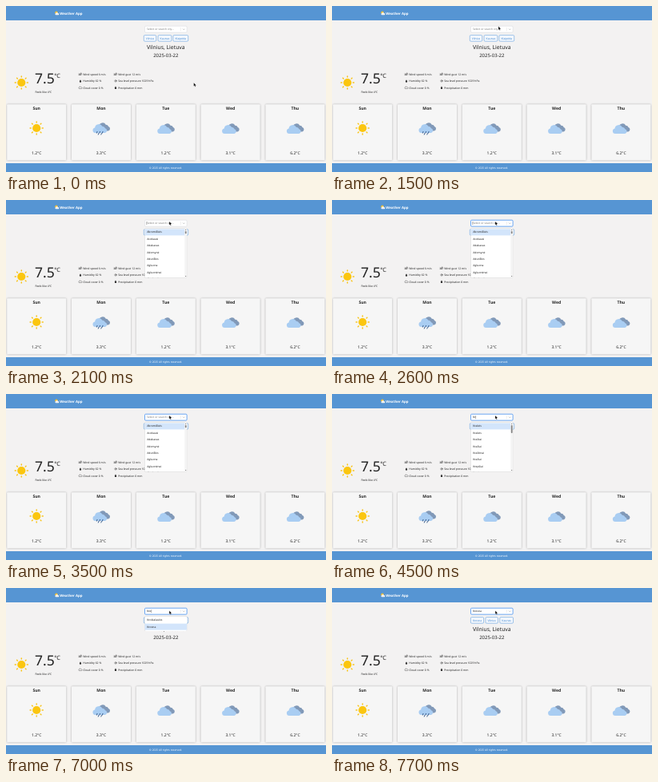
Write an HTML page that moves like this. It is 400 px wide and 208 px high and loops after 8 s.

```html
<!DOCTYPE html>
<html lang="lt">
<head>
<meta charset="utf-8">
<title>Weather App</title>
<style>
  html, body { margin: 0; width: 100%; height: 100%; overflow: hidden; background: #f3f2f2; }
  svg { display: block; width: 400px; height: 208px; }
  text { font-family: "Noto Sans", "Open Sans", sans-serif; fill: #222; text-rendering: geometricPrecision; }
  .bar { fill: #5695d3; }
  .light { fill: #fff; }
  .bold { font-weight: 700; }
  .hint { fill: #808080; }
  .chip { fill: #f4f8fd; stroke: #4a90d9; stroke-width: .5; }
  .chip-label { fill: #3f86d2; }
  .card { fill: #f6f6f6; filter: drop-shadow(0 .8px 1px rgba(0, 0, 0, .3)); }
  .menu { fill: #fff; filter: drop-shadow(0 .6px .7px rgba(0, 0, 0, .3)); }
  .pick { fill: #d3e5fb; }
  .line { fill: none; stroke: #333; stroke-width: .45; stroke-linecap: round; }
</style>
</head>
<body>
<svg id="stage" viewBox="0 0 400 208">
  <defs>
    <g id="sun">
      <path id="rays" stroke="#f8c51d" stroke-width="1.5" stroke-linecap="round"/>
      <circle r="5.1" fill="#fbc60f"/>
    </g>
    <path id="puff" d="M-6 5.2a3.4 3.4 0 0 1-.5-6.7A5 5 0 0 1 2.8-3.2 3.7 3.7 0 0 1 6.4-.6a3 3 0 0 1-.2 5.8Z"/>
    <g id="clouds">
      <use href="#puff" transform="translate(3.2 -1.4) scale(.92)" fill="#8199b8"/>
      <use href="#puff" transform="translate(-1.4 .9)" fill="#a9cdf2"/>
    </g>
    <g id="rain">
      <use href="#clouds" y="-1"/>
      <path d="M-5 3.4l-.6 1.8M-1.5 3.4l-.6 1.8M2 3.4l-.6 1.8M-3.2 5.6l-.5 1.5M.4 5.6l-.5 1.5" stroke="#3d5f8d" stroke-width="1" stroke-linecap="round"/>
    </g>
    <path id="wind" class="line" d="M-2-.5H.8a.6.6 0 1 0-.6-.6M-1.6.3H1.8M-2 1H.6"/>
    <path id="drop" d="M0-1.7C.5-.8 1.2-.1 1.2.6a1.2 1.2 0 0 1-2.4 0C-1.2-.1-.5-.8 0-1.7Z" fill="#333"/>
    <use id="cover" href="#puff" transform="scale(.24)" fill="none" stroke="#333" stroke-width="1.7"/>
    <g id="gauge" class="line"><circle r="1.2"/><path d="M0 0l.6-.6"/></g>
    <clipPath id="list"><rect x="173.5" y="35.4" width="52.6" height="62.2" rx="1.2"/></clipPath>
  </defs>
</svg>
<script>
const LOOP = 8000;
const stage = document.getElementById('stage');
const timed = [];

document.getElementById('rays').setAttribute('d', Array.from({ length: 8 }, (_, i) => {
  const a = i * Math.PI / 4, at = r => `${r * Math.cos(a)} ${r * Math.sin(a)}`;
  return `M${at(7)}L${at(8.1)}`;
}).join(''));

function add(tag, attrs, parent = stage) {
  const el = document.createElementNS('http://www.w3.org/2000/svg', tag);
  for (const k in attrs) el.setAttribute(k, attrs[k]);
  return parent.appendChild(el);
}

// y is the middle of the capitals
function label(str, x, y, size, { cls = '', anchor = 'start', parent } = {}) {
  const el = add('text', { x, y: y + size * .36, 'font-size': size, class: cls, 'text-anchor': anchor }, parent);
  el.textContent = str;
  return el;
}

const box = (x, y, width, height, cls, parent, rx = 0) =>
  add('rect', { x, y, width, height, rx, class: cls }, parent);
const icon = (name, x, y) => add('use', { href: '#' + name, x, y });

// Group shown only during the given [from, to) spans
function during(...spans) {
  const el = add('g', {});
  timed.push({ el, spans });
  return el;
}

function chips(parent, items) {
  for (const [name, x, w] of items) {
    box(x, 36.6, w, 7.6, 'chip', parent, 1.2);
    label(name, x + w / 2, 40.4, 3.4, { cls: 'chip-label', anchor: 'middle', parent });
  }
}

function menu(parent, names, thumb) {
  const h = thumb ? 62.2 : 18.6;
  box(173.5, 35.4, 52.6, h, 'menu', parent, 1.2);
  const rows = add('g', { 'clip-path': 'url(#list)' }, parent);
  if (thumb) box(173.5, 36.4, 50, 8, 'pick', rows);
  names.forEach((n, i) => label(n, 176.2, 40.2 + i * 8.37, 3.4, { parent: rows }));
  if (!thumb) return;
  box(223.3, 35.4, 2.8, 62.2, '', rows).setAttribute('fill', '#f4f4f4');
  box(223.8, 39, 1.8, thumb, '', rows, .8).setAttribute('fill', '#858585');
  add('path', { d: 'M223.9 38.1l.8-1.1.8 1.1ZM223.9 95l.8 1.1.8-1.1Z', fill: '#555' }, rows);
}

// Page
box(0, 0, 400, 18, 'bar');
add('circle', { cx: 63, cy: 8.3, r: 1.7, fill: '#fbc02d' });
add('use', { href: '#puff', transform: 'translate(64 9.7) scale(.28)', fill: '#f1f1f1' });
label('Weather App', 67.2, 9, 4.35, { cls: 'light bold' });

chips(during([0, 7600]), [['Vilnius', 172.3, 15.4], ['Kaunas', 190.1, 16.7], ['Klaipėda', 208.9, 18.8]]);
chips(during([7600, LOOP]), [['Krosna', 173.4, 16.2], ['Vilnius', 192, 15.4], ['Kaunas', 209.8, 16.7]]);
label('Vilnius, Lietuva', 199.8, 51.8, 6.8, { anchor: 'middle' });
label('2025-03-22', 199.8, 61.9, 6, { anchor: 'middle' });

icon('sun', 19.3, 96);
label('7.5', 36, 90.4, 17.5);
label('°C', 60.2, 87, 7.4);
label('Feels like 4°C', 36.4, 108, 3.4);
[
  ['wind', 'Wind speed 6 m/s', 'wind', 'Wind gust 12 m/s'],
  ['drop', 'Humidity 62 %', 'gauge', 'Sea level pressure 1029 hPa'],
  ['cover', 'Cloud cover 0 %', 'drop', 'Precipitation 0 mm']
].forEach(([a, left, b, right], i) => {
  const y = 85.5 + i * 8.4;
  icon(a, 93, y);
  label(left, 96.2, y, 3.4);
  icon(b, 137, y);
  label(right, 140.2, y, 3.4);
});

[
  ['Sun', 'sun', '1.2'], ['Mon', 'rain', '3.3'], ['Tue', 'clouds', '1.2'],
  ['Wed', 'clouds', '3.1'], ['Thu', 'clouds', '6.2']
].forEach(([day, sky, temp], i) => {
  const x = 38.2 + i * 80.8;
  box(x - 37, 123.2, 74, 70, 'card', stage, 1);
  label(day, x, 128, 5.1, { cls: 'bold', anchor: 'middle' });
  icon(sky, x, sky === 'sun' ? 153 : 154);
  label(temp + '°C', x, 184.4, 5, { anchor: 'middle' });
});

box(0, 197, 400, 11, 'bar');
label('© 2025 All rights reserved.', 199.6, 202.5, 3.3, { cls: 'light', anchor: 'middle' });

// Search box
const field = (parent, stroke, w) => add('rect', {
  x: 173.5, y: 25.2, width: 52.6, height: 7.9, rx: 1.2, fill: '#fff', stroke, 'stroke-width': w
}, parent);
field(during([0, 2500]), '#c4c9d0', .35);
field(during([2500, LOOP]), '#3b8bf0', .75);
add('path', { d: 'M218.3 27v4.3', stroke: '#ccc', 'stroke-width': .35 });
add('path', { d: 'M221.1 28.6l1.1 1.1 1.1-1.1', fill: 'none', stroke: '#999', 'stroke-width': .6 });

[
  ['Select or search city...', 0, 4000, 'hint'], ['K', 4000, 4500], ['Kr', 4500, 4700],
  ['Kro', 4700, 7600], ['Krosna', 7600, LOOP]
].forEach(([str, from, to, cls]) =>
  label(str, 175.9, 29.1, 3.4, { cls, parent: during([from, to]) }));

const caret = (x, ...spans) =>
  add('path', { d: `M${x} 27.1v4`, stroke: '#222', 'stroke-width': .35 }, during(...spans));
caret(175.8, [2100, 3000]);
caret(178.2, [4000, 4500]);
caret(179.6, [4500, 4700]);
caret(181.7, [4700, 5000], [5500, 6400], [7000, 7300]);

menu(during([2100, 4000]), ['Abromiškės', 'Acokavai', 'Adakavas', 'Adomynė', 'Adutiškis', 'Agluona', 'Agluonėnai', 'Akademija'], 3.2);
menu(during([4000, 4500]), ['Abromiškės', 'Acokavai', 'Adakavas', 'Adutiškis', 'Akademija', 'Akmenė', 'Alkiškiai', 'Alksnėnai'], 3.2);
menu(during([4500, 4700]), ['Krakės', 'Krakės', 'Kraštai', 'Kražiai', 'Kraštinai', 'Kražiai', 'Krepšiai', 'Kretinga'], 10);
const short = during([4700, 7600]);
menu(short, []);
box(173.5, 36.4, 52.6, 8, 'pick', during([4700, 7000]));
box(173.5, 44.6, 52.6, 8, 'pick', during([7000, 7600]));
const found = during([4700, 7600]);
['Krokialaukis', 'Krosna'].forEach((n, i) => label(n, 176.2, 40.2 + i * 8.37, 3.4, { parent: found }));

// Pointer: time, x, y
const path = [
  [0, 234.7, 96.3], [1500, 208, 25.6], [1600, 205.6, 26.4], [1700, 204, 27],
  [5500, 202.8, 27.7], [6400, 203.5, 28], [6500, 204.1, 28.4]
];
const pointer = add('path', {
  d: 'M0 0V4.3L1 3.4 1.7 5 2.4 4.7 1.7 3.1H3.1Z', fill: '#000', stroke: '#fff', 'stroke-width': .2
});

function draw(now) {
  const t = now % LOOP;
  for (const { el, spans } of timed)
    el.style.display = spans.some(([a, b]) => t >= a && t < b) ? '' : 'none';
  const [, x, y] = path.findLast(p => t >= p[0]);
  pointer.setAttribute('transform', `translate(${x} ${y})`);
}

const start = performance.now();
function tick() {
  draw(performance.now() - start);
  requestAnimationFrame(tick);
}
tick();
</script>
</body>
</html>
```
